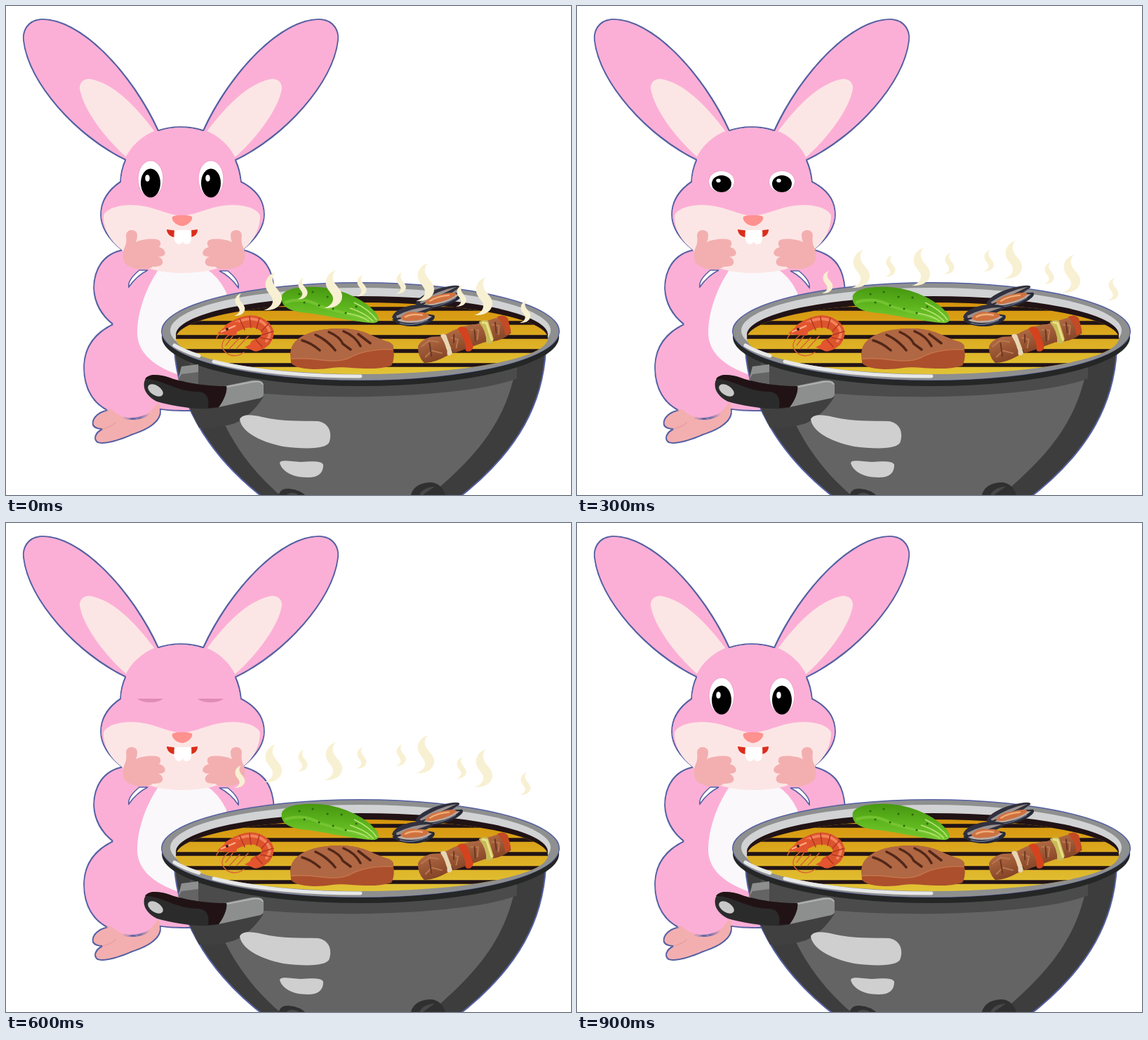
These frames come from a looping animation (805 by 696 pixels, 1.2 s). An HTML page:

```html
<!DOCTYPE html>
<html lang="en">
<head>
<meta charset="utf-8">
<title>Bunny at the barbecue</title>
<style>
html, body { margin: 0; width: 100%; height: 100%; overflow: hidden; background: #fff; }
svg { display: block; width: 100vw; height: 100vh; }
</style>
</head>
<body>
<svg viewBox="0 0 805 696" xmlns="http://www.w3.org/2000/svg">
<defs>
  <linearGradient id="glow" x1="0" y1="0" x2="0" y2="1">
    <stop stop-color="#d6930c"/><stop offset="1" stop-color="#e2c436"/>
  </linearGradient>
  <linearGradient id="green" x1=".4" y1="0" x2=".25" y2="1">
    <stop stop-color="#469710"/><stop offset=".5" stop-color="#5db51e"/><stop offset="1" stop-color="#7ccb32"/>
  </linearGradient>
  <linearGradient id="meat" x1="0" y1="0" x2="0" y2="1">
    <stop stop-color="#b06943"/><stop offset="1" stop-color="#854527"/>
  </linearGradient>
  <filter id="inset" color-interpolation-filters="sRGB"><feMorphology operator="erode" radius="1"/></filter>
  <clipPath id="grate"><ellipse cx="507" cy="473" rx="265" ry="51"/></clipPath>
  <path id="ear" d="M218 179C180 95 105 15 48 19C30 21 23 36 25 50C32 110 100 185 172 220L205 215Z"/>
  <path id="innerEar" d="M175 220C140 190 108 147 104 118C103 106 112 100 126 104C160 113 190 147 216 182L205 215Z"/>
  <path id="head" d="M163 250C165 205 200 172 249 172C298 172 331 205 335 250C355 260 368 275 368 297C368 318 352 335 337 347C320 372 290 380 251 380C213 380 180 370 165 347C150 335 135 318 135 297C135 278 145 262 163 250Z"/>
  <path id="hand" d="M171 327C171 316 187 317 187 326Q187 332 185 336C195 331 215 330 219 334Q222 340 218 343C226 345 229 352 225 355Q222 357 217 357C224 359 225 366 221 369Q217 371 209 371C205 375 195 375 185 374C170 370 165 365 167 350C168 343 173 340 171 327Z"/>
  <path id="gap" d="M175 400Q173 390 190 376L202 376Q186 384 175 400Z"/>
  <path id="wisp" d="M17 0C7 3 1 12 3 21C5 30 14 34 13 42C12 48 7 52 0 54C14 55 26 49 26 37C26 27 15 22 13 13C12 7 14 3 17 0Z"/>
  <g id="rabbit">
    <use href="#ear"/><use href="#ear" transform="matrix(-1 0 0 1 498 0)"/>
    <path d="M167 347C138 352 125 375 125 402C126 425 138 442 152 453C127 465 111 485 111 515C111 545 125 568 148 577C160 590 190 590 205 580L220 574C240 577 300 580 330 560L382 404C380 375 370 355 338 347Z"/>
    <use href="#head"/>
  </g>
  <path id="foot" d="M149 575C135 575 121 585 124 597Q127 602 137 602C127 607 124 616 130 621C140 625 165 617 180 610C205 602 222 590 220 575L217 566C208 578 200 587 180 588Q160 587 149 575Z"/>
  <path id="bowl" d="M240 490C244 550 276 632 372 704H640C735 632 765 560 769 490Z"/>
  <g id="mussel">
    <path d="M-31 5C-28-6-8-14 15-13Q30-12 27-7C15 0 0 8-28 9Z" fill="#30303e"/>
    <path d="M-25 3Q0-10 24-9Q5-2-24 7Z" fill="#9a918f"/>
    <path d="M-31 8C-20 5 15-3 29 2C34 9 15 19-4 18Q-24 17-31 8Z" fill="#262936"/>
    <path d="M-24 9Q8-2 26 4Q15 13-4 13Q-18 13-24 9Z" fill="#b9aaa2"/>
    <path d="M-19 6Q-11-5 4-2Q20-3 22 3Q14 10-4 10Q-16 11-19 6Z" fill="#cf7140"/>
    <path d="M-13 5Q-3-1 13 2" fill="none" stroke="#f0ad78" stroke-width="2.5"/>
    <path d="M-20 13Q-4 19 20 9" fill="none" stroke="#66718a" stroke-width="1.5"/>
  </g>
</defs>

<g fill="#5560a2" stroke="#5560a2" stroke-width="1.6">
  <use href="#rabbit"/><use href="#foot"/>
</g>
<g filter="url(#inset)">
  <use href="#rabbit" fill="#fcafd6"/>
  <g fill="#fce6e5">
    <use href="#innerEar"/><use href="#innerEar" transform="matrix(-1 0 0 1 498 0)"/>
  </g>
  <use href="#head" fill="#fcafd6"/>
  <use href="#foot" fill="#f3afb0"/>
</g>
<path d="M137 602Q151 599 157 592" fill="none" stroke="#e89da0" stroke-width="1.2"/>
<path d="M218 374C200 400 187 435 187 465C187 490 205 510 243 524L320 480L314 408Q303 385 285 374Z" fill="#faf8fa"/>
<g fill="#fff" stroke="#5560a2" stroke-width="1.6">
  <use href="#gap"/><use href="#gap" transform="matrix(-1 0 0 1 506 1)"/>
</g>
<path d="M139 298C145 284 178 279 206 287C226 293 238 298 250 299C262 298 275 293 295 287C323 279 356 284 362 298C362 320 350 338 337 347C322 372 288 380 251 380C213 380 180 370 165 347C150 336 138 318 139 298Z" fill="#fce6e5"/>
<g id="eyes"></g>
<path d="M237 300C240 297 262 297 265 300C267 305 258 313 251 313C244 313 235 306 237 300Z" fill="#ff918f"/>
<path d="M229 318Q251 322 273 318C273 325 268 329 262 329H240C232 328 229 322 229 318Z" fill="#dc2d1b"/>
<path d="M240 319H264C265 330 264 339 258 339Q252 339 252 334Q251 339 246 339C239 338 239 328 240 319Z" fill="#fff"/>
<g fill="#f3afb0">
  <use href="#hand"/><use href="#hand" transform="matrix(-1 0 0 1 507 0)"/>
</g>

<use href="#bowl" fill="#3d3d3d" stroke="#5560a2" stroke-width="2"/>
<path d="M288 520C298 590 340 655 395 700H600C672 640 715 590 728 505Z" fill="#646464"/>
<path d="M262 490H728V530C650 562 370 566 262 535Z" fill="#4b4b4b"/>
<path d="M262 573L367 556Q350 583 326 594Q300 602 275 600Z" fill="#404040"/>
<path d="M388 700Q389 686 403 687Q420 688 430 700M576 700Q579 679 605 678Q622 679 627 700" fill="#303030"/>
<path d="M398 700Q401 690 414 694L423 700M588 700Q591 685 611 684" fill="#484848"/>
<g fill="#cfcfcf">
  <path d="M333 588C338 580 350 582 365 585C395 592 420 590 445 591C462 594 465 610 460 622C452 632 420 630 395 627C360 620 335 605 333 588Z"/>
  <path d="M390 650C392 645 405 648 420 649C435 648 450 647 452 653C452 665 445 671 430 671C405 671 392 660 390 650Z"/>
</g>
<ellipse cx="505" cy="471" rx="283" ry="70" fill="#252626"/>
<ellipse cx="505" cy="463" rx="284" ry="70" fill="#5560a2"/>
<ellipse cx="505" cy="463.5" rx="282.5" ry="69" fill="#8e8f8f"/>
<ellipse cx="505" cy="462" rx="271" ry="61" fill="#d1d2d3"/>
<ellipse cx="507" cy="468" rx="265" ry="55" fill="#211315"/>
<g clip-path="url(#grate)">
  <path d="M240 420H775V524H240Z" fill="url(#glow)"/>
  <path d="M240 431H775M240 451H775M240 471H775M240 491H775M240 511H775" stroke="#211315" stroke-width="5.5"/>
</g>
<g fill="none" stroke="#e7e8e8" stroke-width="5" stroke-linecap="round">
  <path d="M240 483A277 64 0 0 0 275 498"/><path d="M296 506A277 64 0 0 0 505 527"/>
</g>

<path d="M250 513L274 510V537L245 532Z" fill="#8d8e8e"/>
<path d="M250 524L274 521V540L245 532Z" fill="#646464"/>
<path d="M306 542L350 533Q367 531 367 540V552Q367 558 358 559L303 571Z" fill="#8d8e8e"/>
<path d="M310 543L351 535Q364 533 366 539" fill="none" stroke="#b0b1b1" stroke-width="2"/>
<path d="M197 535C200 523 215 524 230 528C250 536 290 542 314 541C316 550 308 565 303 571C280 577 240 570 215 563C200 555 195 545 197 535Z" fill="#2b2b2c"/>
<path d="M198 531C203 523 216 524 230 528C250 536 290 542 314 541C316 550 308 565 303 571L288 572C290 560 287 550 274 549C242 549 220 530 198 531Z" fill="#211315"/>
<ellipse cx="213" cy="547" rx="12" ry="7" transform="rotate(33 213 547)" fill="#c9c9c9"/>

<path d="M393 412C398 402 420 399 445 400C480 402 515 420 528 438C534 448 530 452 520 451C490 449 455 440 430 437C405 435 390 428 393 412Z" fill="url(#green)"/>
<path d="M397 422Q425 413 449 428Q474 435 520 447" fill="none" stroke="#83cf3b" stroke-width="4" opacity=".6"/>
<path d="M496 422Q519 433 528 447M490 430Q514 438 523 449M484 437Q506 440 517 449" fill="none" stroke="#b8e477" stroke-width="1.5"/>
<path d="M418 410h.1M437 407h.1M458 414h.1M478 415h.1M446 426h.1M466 431h.1M484 437h.1M499 428h.1M425 422h.1" stroke="#2d690a" stroke-width="3" stroke-linecap="round"/>

<g fill="none" stroke-linecap="round">
  <path d="M318 468Q300 482 314 494Q326 502 339 493M311 464Q301 467 300 473M323 470L313 483M333 472L318 488M345 470L329 487" stroke="#d96531" stroke-width="1.4"/>
  <path d="M319 460Q343 444 360 451Q380 461 369 476Q362 482 356 483" stroke="#dc542c" stroke-width="17"/>
  <path d="M320 455Q344 440 362 448Q384 461 371 477" stroke="#f4825a" stroke-width="4"/>
  <path d="M333 445L340 461M347 442L349 458M361 444L357 459M375 451L364 463M381 463L365 468M378 475L363 472M365 485L356 475" stroke="#b63624" stroke-width="1.6"/>
</g>
<path d="M301 466L318 451L332 449L328 469Q314 469 301 466ZM355 477L340 486L354 491L363 485Z" fill="#e4552f"/>
<path d="M306 464L327 455" stroke="#ffad82" stroke-width="2"/>
<circle cx="315" cy="460" r="2" fill="#331a18"/>

<path d="M405 493C410 470 440 458 480 459C515 461 520 471 545 478C555 482 554 505 549 512C520 521 485 512 465 515C440 519 410 517 406 507Z" fill="#ab4f2c"/>
<path d="M406 489C410 470 440 458 480 459C515 461 520 471 545 478Q555 482 551 489C520 486 503 494 489 501C465 511 443 500 406 503Z" fill="#b06743"/>
<path d="M407 502C443 499 463 511 489 501C507 491 526 488 551 489" fill="none" stroke="#c5734c" stroke-width="1.5"/>
<g fill="none" stroke="#512719" stroke-width="3.5" stroke-linecap="round">
  <path d="M422 476Q434 479 447 490M441 468Q458 476 469 490M460 464Q476 471 480 481L491 489M481 463Q498 470 505 484M502 467L519 480"/>
</g>

<use href="#mussel" transform="translate(617 413) rotate(-12) scale(1.14 .85)"/>
<use href="#mussel" transform="translate(581 438)"/>

<g transform="translate(653 474) rotate(-17.5)">
  <path d="M-66-10Q-60-18-43-17L-28-13L-29 15Q-52 20-65 15Q-71 3-66-10Z" fill="url(#meat)"/>
  <path d="M-24-14Q4-20 22-15L61-15Q69-10 66 12Q48 20 26 13L-21 15Z" fill="url(#meat)"/>
  <path d="M-31-15Q-26-18-23-13L-22 13Q-26 19-30 14Q-26 4-31-15Z" fill="#e8d5b4"/>
  <path d="M-5-17Q3-21 8-13L9 14Q4 22-3 17Q2 2-5-17Z" fill="#d4431e"/>
  <path d="M27-17Q36-19 40-14L40 12Q36 20 28 15Q34 0 27-17Z" fill="#c8bb56"/>
  <path d="M31-15L37-12V14" fill="none" stroke="#eadf8e" stroke-width="3"/>
  <path d="M54-16Q65-18 68-9L67 8Q63 14 57 12Q61-2 54-16Z" fill="#c34a25"/>
  <path d="M-62-8L-48-13L-36-7M-61 8L-49 2L-36 10M-18-8L-9-2L-15 9M12-10L23-6L17 7M43-8L53-3L48 9" fill="none" stroke="#b87850" stroke-width="2"/>
  <path d="M-49-10L-52 10M-12-11L-16 1M18-9L14 8M49-10L46 6" stroke="#6d3723" stroke-width="2"/>
</g>

<g id="steam" fill="#f8f0d2"></g>
</svg>
<script>
const STEP = 300;
const eyes = document.getElementById('eyes');
const steam = document.getElementById('steam');

const ellipse = (cx, cy, rx, ry, attrs) =>
  `<ellipse cx="${cx}" cy="${cy}" rx="${rx}" ry="${ry}" ${attrs}/>`;

const eyeShapes = {
  open: x => ellipse(x, 246, 18, 26, 'fill="#fff" stroke="#ee9fc8"') +
    ellipse(x, 252, 14, 20.5, '') + ellipse(x - 4.5, 245, 3.2, 4.8, 'fill="#fff"'),
  half: x => ellipse(x, 250, 18.5, 15.5, 'fill="#fff" stroke="#ee9fc8"') +
    ellipse(x, 253, 14, 12, '') + ellipse(x - 4.5, 248.5, 3.2, 2.8, 'fill="#fff"'),
  closed: x => `<path d="M${x - 19} 250H${x + 18}C${x + 10} 257 ${x - 11} 257 ${x - 19} 250Z" fill="#df8cb7"/>`
};

// Eye pose and steam offset of each step
const poses = [
  { eye: 'open', drift: [0, 0] },
  { eye: 'half', drift: [24, -32] },
  { eye: 'closed', drift: [0, -64] },
  { eye: 'open', drift: null }
];

// Wisp position and scale
const wisps = [
  [325, 409, .59], [367, 379, 1], [415, 387, .56], [453, 376, 1], [499, 383, .56],
  [555, 379, .57], [584, 366, 1], [641, 397, .57], [667, 386, 1], [732, 419, .59]
];
steam.innerHTML = wisps.map(([x, y, s]) =>
  `<use href="#wisp" transform="translate(${x} ${y}) scale(${s})"/>`).join('');

let shown = -1;
function render(time) {
  const step = Math.floor(time / STEP) % poses.length;
  if (step !== shown) {
    const { eye, drift } = poses[step];
    eyes.innerHTML = [206, 292].map(eyeShapes[eye]).join('');
    steam.setAttribute('visibility', drift ? 'visible' : 'hidden');
    if (drift) steam.setAttribute('transform', `translate(${drift})`);
    shown = step;
  }
}

const start = performance.now();
function tick() {
  render(performance.now() - start);
  requestAnimationFrame(tick);
}
tick();
</script>
</body>
</html>
```
